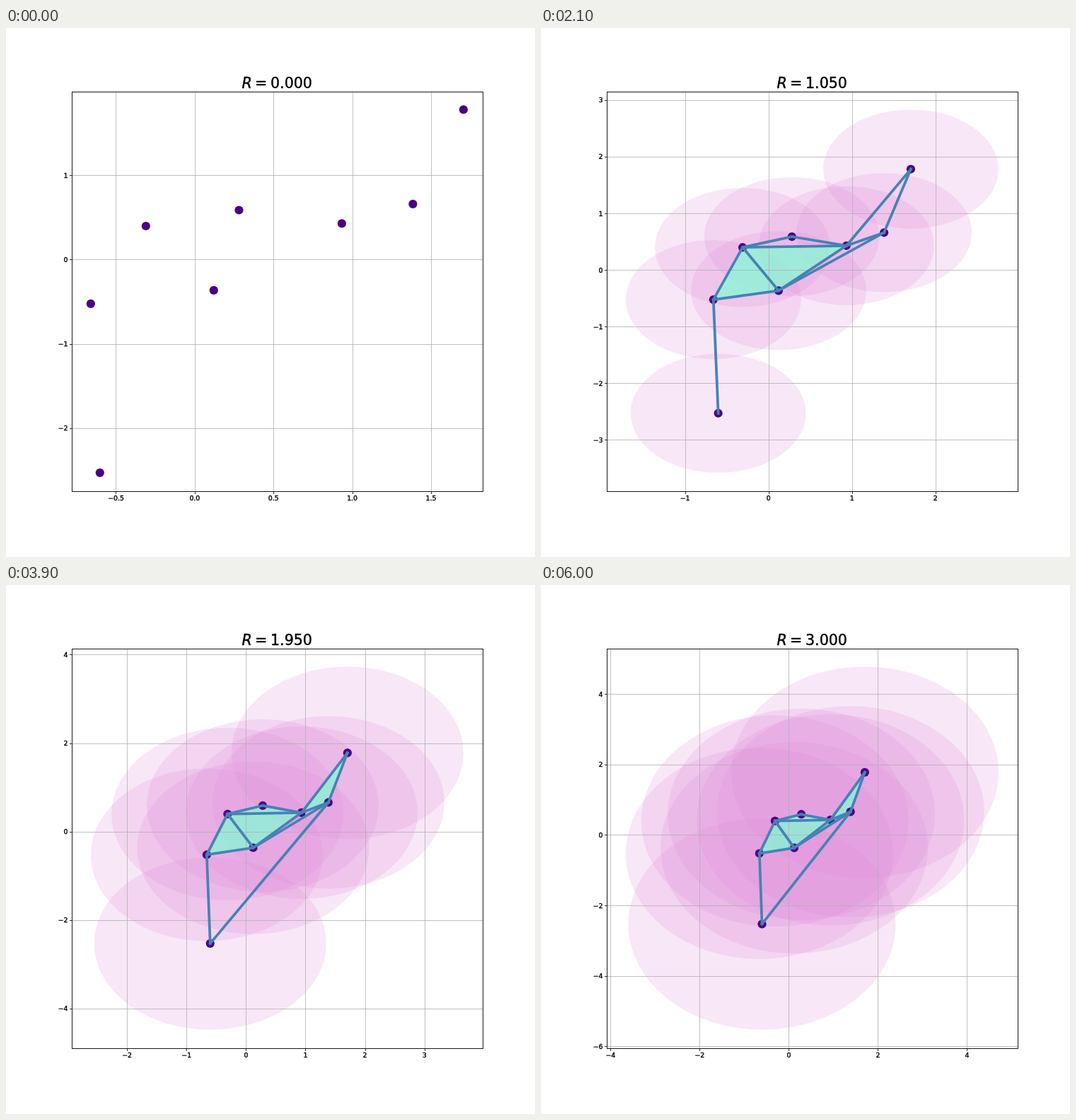
Write an HTML page with a canvas that moves like this. It is 748x748 px and loops after 6.1 s.

```html
<!DOCTYPE html>
<html lang="en">
<head>
<meta charset="utf-8">
<title>Growing balls</title>
<style>
html, body { margin: 0; height: 100%; overflow: hidden; background: #fff; }
canvas { display: block; }
</style>
</head>
<body>
<canvas id="stage" width="748" height="748"></canvas>
<script>
const ctx = document.getElementById('stage').getContext('2d');
const FONT = '"DejaVu Sans", sans-serif';
const LEFT = 93.5, RIGHT = 673.2, TOP = 89.76, BOTTOM = 654.5;
const FRAME = { left: 93.5, right: 674.5, top: 90.5, bottom: 655.5 };
const STEPS = 61, STEP_MS = 100, STEP_R = 0.05;

const points = {
  A: [-0.660, -0.524], B: [-0.602, -2.529], C: [-0.310, 0.398], D: [0.121, -0.365],
  E: [0.281, 0.587], F: [0.934, 0.428], G: [1.385, 0.659], H: [1.706, 1.779]
};
const all = Object.values(points);
const corners = name => [...name].map(c => points[c]);
const dist = (p, q) => Math.hypot(p[0] - q[0], p[1] - q[1]);

function circumradius([p, q, r]) {
  const cross = (q[0] - p[0]) * (r[1] - p[1]) - (q[1] - p[1]) * (r[0] - p[0]);
  return dist(p, q) * dist(q, r) * dist(r, p) / (2 * Math.abs(cross));
}

// Each simplex appears once the radius reaches its birth value.
const edges = 'AB AC AD CD CE EF CF DF FG DG GH FH BG'.split(' ').map(corners)
  .map(pts => ({ pts, birth: dist(...pts) / 2 }));
const triangles = 'ACD CDF CEF DFG FGH'.split(' ').map(corners)
  .map(pts => ({ pts, birth: circumradius(pts) }));

// Linear axis fitted to all balls with a 5% margin, at most nine tick intervals.
function makeAxis(dim, radius, start, end) {
  const values = all.map(p => p[dim]);
  const low = Math.min(...values) - radius, high = Math.max(...values) + radius;
  const margin = (high - low) * 0.05;
  const min = low - margin, max = high + margin;
  const step = [0.25, 0.5, 1, 2].find(s => s >= (max - min) / 9);
  const scale = (end - start) / (max - min);
  const ticks = [];
  for (let i = Math.ceil(min / step); i * step <= max; i++) ticks.push(i * step);
  return {
    scale: Math.abs(scale), ticks,
    at: v => start + (v - min) * scale,
    label: v => v.toFixed(step < 1 ? 1 : 0).replace('-', '\u2212')
  };
}

function path(pts, x, y) {
  ctx.beginPath();
  pts.forEach(p => ctx.lineTo(x.at(p[0]), y.at(p[1])));
}

function line(x1, y1, x2, y2) {
  ctx.beginPath();
  ctx.moveTo(x1, y1);
  ctx.lineTo(x2, y2);
  ctx.stroke();
}

function text(str, x, y) {
  ctx.lineWidth = 0.4;
  ctx.strokeText(str, x, y);
  ctx.fillText(str, x, y);
}

function drawAxes(x, y) {
  const { left, right, top, bottom } = FRAME;
  const snap = v => Math.round(v) + 0.5;
  const columns = x.ticks.map(v => snap(x.at(v)));
  const rows = y.ticks.map(v => snap(y.at(v)));
  ctx.lineWidth = 0.8;
  ctx.strokeStyle = '#b0b0b0';
  columns.forEach(c => line(c, top, c, bottom));
  rows.forEach(r => line(left, r, right, r));
  ctx.strokeStyle = ctx.fillStyle = '#000';
  columns.forEach(c => line(c, bottom, c, bottom + 3.5));
  rows.forEach(r => line(left - 3.5, r, left, r));

  ctx.font = '9.35px ' + FONT;
  ctx.textAlign = 'center';
  x.ticks.forEach(v => text(x.label(v), x.at(v), 667.8));
  ctx.textAlign = 'right';
  y.ticks.forEach(v => text(y.label(v), 87.5, y.at(v) + 3.6));
}

function drawTitle(radius) {
  ctx.strokeStyle = ctx.fillStyle = '#000';
  ctx.textAlign = 'left';
  ctx.font = 'italic 20.6px ' + FONT;
  text('R', 333.5, 85);
  ctx.font = '20.6px ' + FONT;
  text('=', 352, 85);
  text(radius.toFixed(3), 374, 85);
}

function draw(radius) {
  const x = makeAxis(0, radius, LEFT, RIGHT), y = makeAxis(1, radius, BOTTOM, TOP);
  const born = s => s.birth <= radius;
  ctx.fillStyle = '#fff';
  ctx.fillRect(0, 0, 748, 748);

  ctx.fillStyle = 'rgba(219, 133, 214, 0.2)';
  for (const p of all) {
    ctx.beginPath();
    ctx.ellipse(x.at(p[0]), y.at(p[1]), radius * x.scale, radius * y.scale, 0, 0, 2 * Math.PI);
    ctx.fill();
  }
  ctx.fillStyle = 'rgba(127, 255, 212, 0.7)';
  for (const t of triangles.filter(born)) {
    path(t.pts, x, y);
    ctx.fill();
  }
  ctx.fillStyle = '#4b0082';
  for (const p of all) {
    ctx.beginPath();
    ctx.arc(x.at(p[0]), y.at(p[1]), 6.1, 0, 2 * Math.PI);
    ctx.fill();
  }
  drawAxes(x, y);

  ctx.strokeStyle = '#4682b4';
  ctx.lineWidth = 3.74;
  ctx.lineCap = 'square';
  for (const e of edges.filter(born)) {
    path(e.pts, x, y);
    ctx.stroke();
  }
  ctx.lineCap = 'butt';
  ctx.strokeStyle = '#000';
  ctx.lineWidth = 0.9;
  ctx.strokeRect(FRAME.left, FRAME.top, FRAME.right - FRAME.left, FRAME.bottom - FRAME.top);
  drawTitle(radius);
}

const start = performance.now();
function tick() {
  const step = Math.floor((performance.now() - start) / STEP_MS) % STEPS;
  draw(step * STEP_R);
  requestAnimationFrame(tick);
}
tick();
</script>
</body>
</html>
```
